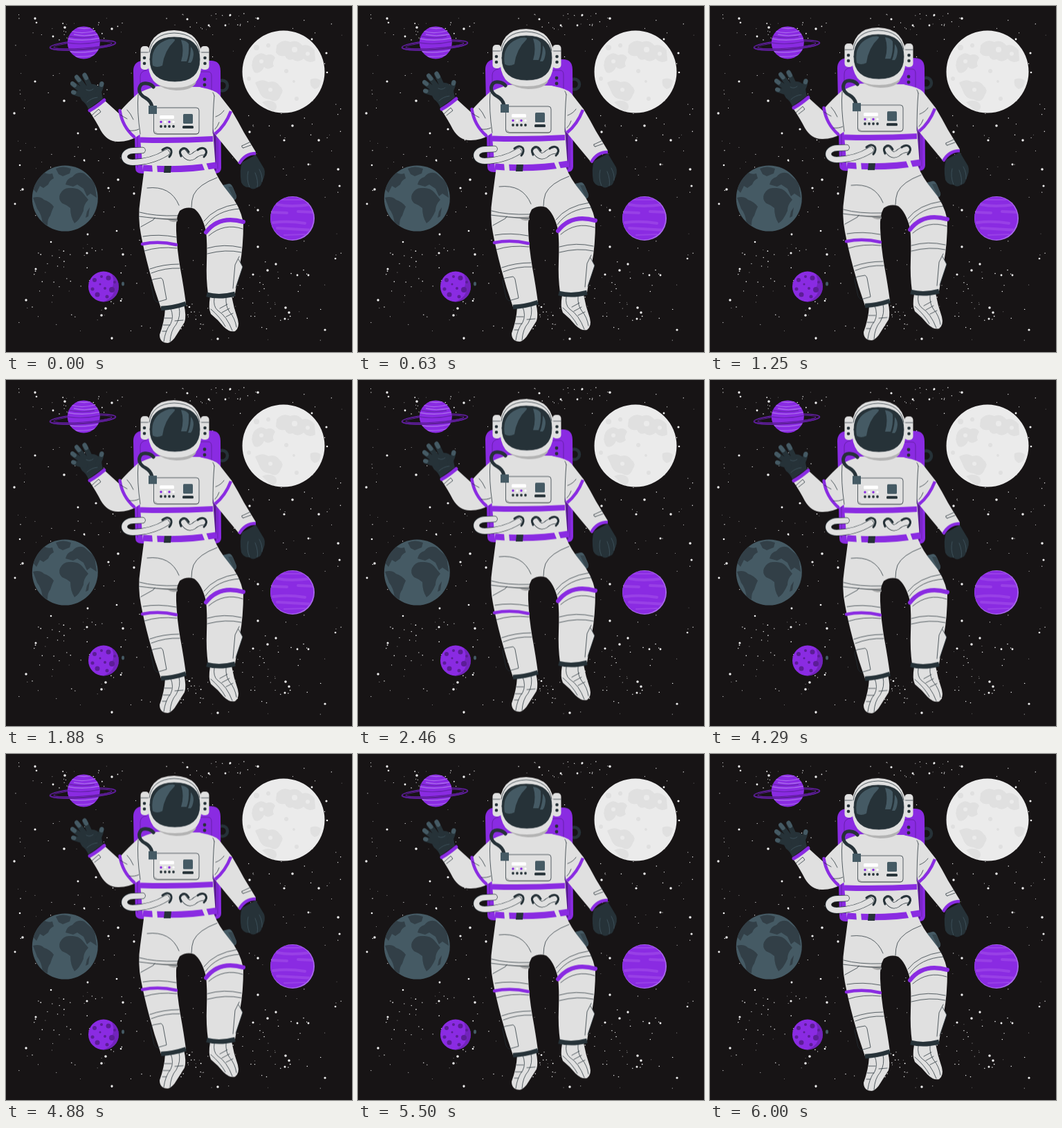
Recreate the animation shown at these times as an HTML page. Size 500 by 500 pixels, loop 6040 ms.

```html
<!DOCTYPE html>
<html lang="en">
<head>
<meta charset="utf-8">
<title>Floating astronaut</title>
<style>
  html, body { margin: 0; width: 100%; height: 100%; overflow: hidden; background: #171415; }
  svg { display: block; width: 100vw; height: 100vh; }
  .suit { fill: #e0e0e0; }
  .dark { fill: #263238; }
  .slate { fill: #455a64; }
  .violet { fill: #8a2be2; }
  .deep { fill: #5c1d97; }
  .line, .band, .tube { fill: none; stroke-linecap: round; stroke-linejoin: round; }
  .line { stroke: #263238; stroke-width: .75; }
  .band { stroke: #8a2be2; }
  .tube { stroke: #263238; }
  .line.pale, .tube.pale { stroke: #455a64; }
  .line.plum { stroke: #5c1d97; }
  .tube.cloth { stroke: #e0e0e0; }
</style>
</head>
<body>
<svg viewBox="0 0 500 500">
  <defs>
    <clipPath id="ringedClip"><circle cx="112.300" cy="53" r="23.500"/></clipPath>
    <clipPath id="moonClip"><circle cx="401" cy="95" r="59.500"/></clipPath>
    <clipPath id="earthClip"><circle cx="85.300" cy="278" r="47.500"/></clipPath>
    <clipPath id="stripedClip"><circle cx="413.200" cy="306.700" r="31"/></clipPath>
    <clipPath id="crateredClip"><circle cx="141" cy="405.500" r="22"/></clipPath>
    <clipPath id="visorClip"><path d="M208 77Q208 45 243 45Q280 45 280 77Q280 109 244 109Q208 109 208 77Z"/></clipPath>
  </defs>

  <g id="stars" fill="#f0f0f0"></g>

  <!-- ringed planet -->
  <g fill="none" stroke="#5c1d97" transform="rotate(-4 111 57)">
    <ellipse cx="111" cy="56.500" rx="47.500" ry="6.500" stroke-width="1.800"/>
    <ellipse cx="111" cy="56.500" rx="42" ry="4.500" stroke-width="1"/>
  </g>
  <circle cx="112.300" cy="53" r="23.500" class="violet"/>
  <g clip-path="url(#ringedClip)" fill="none" stroke="#a867eb" stroke-width="1.300">
    <path d="M94 36Q111 42 134 34M98 41Q114 45 136 40M88 47Q112 52 137 46M92 66Q115 69 137 63M100 73Q116 74 130 70M103 31Q113 34 123 31"/>
    <path d="M89 43Q108 48 128 44M88 53Q112 57 137 51" stroke="#6b22b3"/>
  </g>
  <g fill="none" stroke="#5c1d97" transform="rotate(-4 111 57)">
    <path d="M63.500 56.500A47.500 6.500 0 0 0 158.500 56.500" stroke-width="2"/>
    <path d="M69 56.500A42 4.500 0 0 0 153 56.500" stroke-width="1.200"/>
  </g>

  <!-- moon -->
  <circle cx="401" cy="95" r="59.500" fill="#ebebeb"/>
  <g clip-path="url(#moonClip)" fill="#e0e0e0">
    <path d="M391 57Q399 47 411 52Q421 48 428 57Q438 54 446 64L447 79Q437 84 430 76Q422 83 414 77Q407 80 403 72Q394 74 390 67Z"/>
    <path d="M358 75Q367 64 376 71Q385 68 389 75Q384 82 387 87Q378 94 373 88Q368 99 359 96Q352 86 358 75Z"/>
    <path d="M360 111Q371 104 379 110Q390 107 395 115Q403 121 397 129Q392 142 381 135Q369 134 366 124Z"/>
    <path d="M440 106Q449 102 455 108Q454 119 446 120Q438 116 440 106Z"/>
    <path d="M370 139Q381 134 389 140Q395 149 384 153Z"/>
    <circle cx="362" cy="60" r="4"/><circle cx="379" cy="57" r="3"/>
    <circle cx="405" cy="94" r="3"/><circle cx="416" cy="109" r="2"/>
    <circle cx="351" cy="105" r="3"/><circle cx="420" cy="134" r="3"/>
    <g fill="#ebebeb"><circle cx="417" cy="63" r="4"/><circle cx="436" cy="69" r="3"/><circle cx="369" cy="80" r="3"/><circle cx="382" cy="121" r="3"/></g>
  </g>

  <!-- earth -->
  <circle cx="85.300" cy="278" r="47.500" class="slate"/>
  <g clip-path="url(#earthClip)" fill="#323f47">
    <path d="M38 263Q42 247 54 240Q60 244 67 242L69 249Q63 252 61 258L54 263L49 260L44 270Z"/>
    <path d="M39 277Q49 274 55 280Q64 283 69 290Q66 296 64 303Q60 307 60 317L53 314Q51 300 45 293Z"/>
    <path d="M72 235Q82 230 94 235L92 242L82 246L76 243Z"/>
    <path d="M78 272Q83 262 93 263Q104 262 110 269L119 280Q112 287 112 296Q106 310 99 314Q93 305 93 292Q87 287 81 285Q75 279 78 272Z"/>
    <path d="M86 258Q88 249 96 247Q103 238 113 242L128 255L131 277L122 271L117 275L112 264L103 258L97 261Z"/>
    <path d="M117 297L121 291L119 304L115 306Z"/>
    <path d="M111 236Q148 268 122 310Q115 320 104 325H140V240Z" fill="#263238" opacity=".35"/>
  </g>

  <!-- striped planet -->
  <circle cx="414" cy="307" r="32" fill="#a867eb"/>
  <circle cx="413.200" cy="306.700" r="31" class="violet"/>
  <g clip-path="url(#stripedClip)" fill="none" stroke="#9840e6" stroke-width="4" stroke-linecap="round">
    <path d="M392 287Q411 291 440 287M384 298L406 299M422 297L446 298M392 321L446 324M386 313Q408 310 432 314"/>
    <path d="M398 280L428 280M402 331L432 330" stroke-width="2"/>
  </g>

  <!-- cratered planet -->
  <circle cx="141" cy="405.500" r="22" class="violet"/>
  <g clip-path="url(#crateredClip)" class="deep">
    <path d="M150 383Q159 396 153 408Q160 414 149 423Q143 427 134 429H165V383Z" opacity=".5"/>
    <circle cx="128" cy="396" r="3"/><circle cx="138" cy="391" r="2"/><circle cx="148" cy="393" r="3.500"/>
    <circle cx="125" cy="409" r="2.500"/><circle cx="132" cy="417" r="3.500"/><circle cx="143" cy="408" r="2"/>
    <circle cx="153" cy="410" r="4"/><circle cx="146" cy="420" r="2.500"/><circle cx="136" cy="402" r="1.500"/><circle cx="157" cy="399" r="2"/>
  </g>
  <ellipse cx="169" cy="401.500" rx="2" ry="3" class="slate"/>

  <g id="astronaut">
    <!-- backpack -->
    <circle cx="312.500" cy="115" r="7.500" class="tube" stroke-width="4.500"/>
    <path class="violet" d="M184 94Q184 80 198 79H296Q310 79 310 94L311 234Q311 241 303 242H196Q187 242 187 234Z"/>
    <path class="deep" d="M299 184H304V238L299 240Z"/>
    <path class="line plum" d="M194 131V102Q194 94 203 93M277 95H292Q297 95 297 101V122M306 184V235M190 184V233"/>
    <circle cx="287" cy="106" r="2.400" class="dark"/><circle cx="287" cy="114" r="2.400" class="dark"/>

    <!-- hip pouch -->
    <path class="slate" d="M313 259L321 257Q325 256 328 262L333 274Q334 279 329 281L322 283Z"/>
    <path d="M327 261L333 275L330 280L321 261Z" fill="#37474f"/>

    <!-- raised arm -->
    <path class="suit" d="M201 122L190 127Q177 138 164 153L165 157L143 137L121 153Q131 168 137 180Q147 197 163 196Q178 196 190 188L201 180Z"/>
    <path class="band" stroke-width="4.500" stroke-linecap="butt" d="M164.500 151Q168 174 185 189"/>
    <path class="band" stroke-width="5" stroke-linecap="butt" d="M121 151Q130 146 142 136"/>
    <path class="line" d="M124 158L134 149L137 153L128 160M165 157Q171 161 175 163M175 150Q180 155 184 164M178 180Q186 181 192 178"/>
    <path class="dark" d="M119 149L140 134Q138 127 138 121Q131 111 121 113L109 119Q104 130 110 137Q116 141 119 149Z"/>
    <g class="tube" stroke-width="7.500">
      <path d="M114 130L98 125M112 124L97 113M116 121L103 104M122 118L114 101"/>
      <path d="M132 127Q137 121 138 113" stroke-width="7"/>
    </g>
    <path class="tube pale" stroke-width="6" d="M98.500 125L97 124.500M99 114.500L96 112M105.500 107L102 102.500M116 104L113.500 99.500M138 114L138.500 112"/>
    <path class="line pale" d="M117 139Q123 133 132 132M116 121Q121 124 126 120"/>

    <!-- legs -->
    <path class="suit" d="M200 234H300Q307 252 322 270Q338 288 343 313Q343 348 338 374Q334 396 331 416H292Q289 395 290 370Q291 342 289 325Q283 301 272 293Q261 289 251 296Q245 306 246 325Q247 351 252 380Q257 407 260 430L224 437Q214 409 207 382Q199 352 195 330Q190 305 194 280Z"/>
    <path class="suit" d="M336 365L342 377L332 407L328 409L329 374Z"/>
    <path class="line" d="M336 366L342 377L332 407"/>
    <path fill="#a9a9a9" d="M204 306Q225 308 247 306L248 311Q240 314 234 309Q216 308 204 306Z"/>
    <path class="line" d="M204 263Q238 259 250 288M305 248Q278 258 271 273Q268 281 268 291M193 298Q215 304 248 303M192 304Q215 307 247 309M195 319L213 309L215 306M198 333Q220 329 246 334M200 354Q221 347 247 350M208 380Q227 373 250 373M210 386Q230 378 251 379M286 311Q301 291 335 286M288 318Q304 295 338 293M291 350Q315 343 340 349M291 358Q318 351 340 356M293 332Q315 313 342 322M337 362L331 374L328 408"/>
    <path class="band" stroke-width="4.500" stroke-linecap="butt" d="M197 344Q221 339 246 345"/>
    <path class="band" stroke-width="6" stroke-linecap="butt" d="M289 327Q308 302 343 312"/>
    <path class="line" d="M209 399Q210 396 213 395L224 393Q226 394 227 397L232 424L218 428Q215 426 214 423Z"/>

    <!-- boots -->
    <path class="suit" d="M230 437Q229 456 222 475Q222 487 234 487Q241 485 246 476L258 457Q261 448 257 431Z"/>
    <path class="line" d="M238 437Q243 449 238 459Q230 469 228 485M250 435Q253 448 246 460Q238 469 237 485M229 451L239 451M227 461L237 461M244 455L256 454M226 470L232 470"/>
    <path class="tube" stroke-width="6.500" stroke-linecap="butt" style="stroke-linecap:butt" d="M224 437Q242 436 260 430"/>
    <path class="suit" d="M295 420Q292 437 296 445Q306 453 314 463Q323 472 331 470Q338 465 335 453Q329 436 326 419Z"/>
    <path class="line" d="M301 422Q299 434 306 440Q319 448 327 469M318 421Q317 434 323 442Q331 451 333 464M309 437L320 431M312 443L323 437M318 449L328 444M296 438Q310 450 317 463"/>
    <path class="tube" stroke-width="6.500" style="stroke-linecap:butt" d="M290 417Q309 422 331 416"/>

    <!-- hanging arm -->
    <path class="dark" d="M341 226Q337 238 340 255Q344 263 352 262Q357 267 363 262Q369 261 370 254Q376 243 373 235L361 215Z"/>
    <path class="line pale" d="M352 262Q347 250 350 239M363 262Q365 253 360 241M370 254Q371 245 366 236"/>
    <path class="suit" d="M283 118Q301 121 308 128L326 151Q335 166 344 183L361 211Q346 213 338 229L318 205L301 184Z"/>
    <path class="band" stroke-width="4.500" style="stroke-linecap:butt" d="M302 185Q317 173 325 152"/>
    <path class="band" stroke-width="4.500" style="stroke-linecap:butt" d="M337 228Q345 213 361 213"/>
    <path class="line" d="M341 202L354 196M343 205L354 201M341 202Q340 205 343 205M303 160Q311 157 315 151M302 178Q306 174 308 168"/>

    <!-- torso -->
    <path class="suit" d="M218 116Q202 120 190 127Q189 151 193 180L198 238Q249 243 303 234L299 181Q299 151 304 125L280 117Z"/>
    <path class="line" d="M191 128Q189 151 194 185M301 130Q299 151 299 184M301 130Q300 126 299 125"/>
    <path class="band" stroke-width="8" style="stroke-linecap:butt" d="M194 193.500Q247 195 299 192"/>
    <path class="band" stroke-width="9" style="stroke-linecap:butt" d="M198 234Q250 239 304 230"/>
    <path class="suit" d="M211 229H218L219 241H212ZM283 227L289 226L293 237H287Z"/>
    <path class="dark" d="M229 231H239L238 241H228Z"/>
    <path fill="#b3b3b3" d="M215 110H275Q270 122 246 122Q226 121 215 110Z"/>

    <!-- chest panel -->
    <path fill="#b8b8b8" d="M214 180Q215 186 222 186H274Q279 186 279 181L277 184H219Z"/>
    <rect x="213.500" y="147" width="65.500" height="38" rx="4" class="line"/>
    <rect x="222" y="158" width="21" height="5" rx="1.500" fill="#fff"/>
    <g id="lamps"></g>
    <rect x="256" y="156" width="14" height="14" rx="1.500" class="slate"/>
    <rect x="255" y="173" width="16" height="4" rx="1.500" class="dark"/>

    <!-- hoses -->
    <path class="tube" stroke-width="5" d="M211 145Q209 137 202 133Q192 128 192.500 120Q194 110 204 112Q210 113 213 117"/>
    <rect x="206" y="144" width="12" height="12" class="slate"/>
    <g id="hoses"></g>
    <path class="tube" stroke-width="3" d="M226 208Q233 202 238 207Q241 212 236 218M253 217Q249 209 255 206Q260 204 264 211M277 208Q283 203 288 207Q292 212 286 218"/>

    <!-- helmet -->
    <rect x="194.500" y="58" width="12.500" height="34" rx="5" class="suit"/>
    <rect x="281" y="58" width="12.500" height="34" rx="5" class="suit"/>
    <path class="line" d="M195 67H206M282 67H293"/>
    <g class="dark">
      <circle cx="200" cy="75" r="2.300"/><circle cx="200" cy="83" r="2.300"/>
      <circle cx="287.500" cy="75" r="2.300"/><circle cx="287.500" cy="83" r="2.300"/>
    </g>
    <path class="suit" d="M205 78Q204 35 243 35Q283 36 283 78Q283 99 275 109Q265 118 244 118Q222 118 213 108Q205 97 205 78Z"/>
    <path class="line" d="M207 67Q211 40 243 39Q276 40 280 67"/>
    <path class="dark" d="M208 77Q208 45 243 45Q280 45 280 77Q280 109 244 109Q208 109 208 77Z"/>
    <g clip-path="url(#visorClip)" class="slate">
      <path d="M212 86Q207 57 235 48Q247 46 243 51Q229 64 226 86Q218 90 212 86Z"/>
      <path d="M253 49Q261 50 264 55Q265 70 261 80H253Q258 64 253 49Z"/>
      <path d="M267 59Q271 63 271 70Q270 79 267 82H263Q267 72 267 59Z"/>
    </g>
    <path class="line" d="M208 77Q208 45 243 45Q280 45 280 77Q280 109 244 109Q208 109 208 77Z"/>
  </g>
</svg>
<script>
  const NS = "http://www.w3.org/2000/svg";
  const byId = id => document.getElementById(id);

  function add(parent, tag, attrs) {
    const el = document.createElementNS(NS, tag);
    for (const key in attrs) el.setAttribute(key, attrs[key]);
    parent.append(el);
  }

  function dot(parent, cx, cy, r, fill) {
    add(parent, "circle", fill ? { cx, cy, r, fill } : { cx, cy, r });
  }

  // Seeded generator, so the sky is the same on every load
  let seed = 91;
  function rand() {
    seed = (seed + 0x6d2b79f5) | 0;
    let n = Math.imul(seed ^ (seed >>> 15), seed | 1);
    n ^= n + Math.imul(n ^ (n >>> 7), n | 61);
    return ((n ^ (n >>> 14)) >>> 0) / 4294967296;
  }

  // Prominent stars, as x, y pairs
  const bright = [
    42,18, 44,24, 85,31, 98,37, 68,44, 153,33, 262,19, 317,28, 324,13, 293,28,
    364,18, 442,48, 463,68, 464,96, 42,109, 12,155, 20,230, 13,286, 24,265, 29,425,
    43,380, 65,341, 117,357, 118,330, 104,309, 169,359, 166,426, 138,447, 144,437,
    153,480, 160,325, 185,271, 148,263, 162,251, 364,348, 378,382, 390,373, 421,389,
    437,389, 404,436, 409,443, 403,452, 461,468, 476,365, 480,236, 482,260, 437,229,
    452,194, 402,194, 414,173, 352,182, 364,295, 357,388, 84,137, 130,178, 104,184,
    113,223, 306,481, 265,435
  ];
  const stars = byId("stars");
  for (let i = 0; i < bright.length; i += 2) {
    dot(stars, bright[i], bright[i + 1], 1.3 + rand() * 0.5);
  }
  for (let i = 0; i < 300; i++) {
    dot(stars, 12 + rand() * 474, 10 + rand() * 476, 0.35 + rand() * 0.45);
  }

  // Denser patches: x, y, spread x, spread y
  const patches = [[110, 35, 85, 22], [315, 28, 65, 24], [120, 385, 90, 50], [390, 420, 80, 50], [275, 450, 60, 25]];
  for (const [x, y, w, h] of patches) {
    for (let i = 0; i < 20; i++) {
      dot(stars, x + (rand() + rand() - 1) * w, y + (rand() + rand() - 1) * h, 0.4 + rand() * 0.5);
    }
  }

  for (let i = 0; i < 4; i++) {
    const x = 224 + i * 6;
    dot(byId("lamps"), x, 167.5, 1.7, i % 2 ? "#fff" : "#8a2be2");
    dot(byId("lamps"), x, 174, 1.9, "#263238");
  }

  const hoses = [
    "M232 212C216 222 200 225.500 183 226C167 226 167 209.500 184 209L197 208.500",
    "M257 212Q263 222 271 217Q276 212 284 211"
  ];
  for (const d of hoses) {
    add(byId("hoses"), "path", { d, class: "tube", "stroke-width": 9.4 });
    add(byId("hoses"), "path", { d, class: "tube cloth", "stroke-width": 8 });
  }

  // Steady rise and fall
  const rise = -9.3;
  byId("astronaut").animate(
    [0, rise, 0].map(y => ({ transform: `translateY(${y}px)` })),
    { duration: 6040, iterations: Infinity, easing: "linear" }
  );
</script>
</body>
</html>
```
